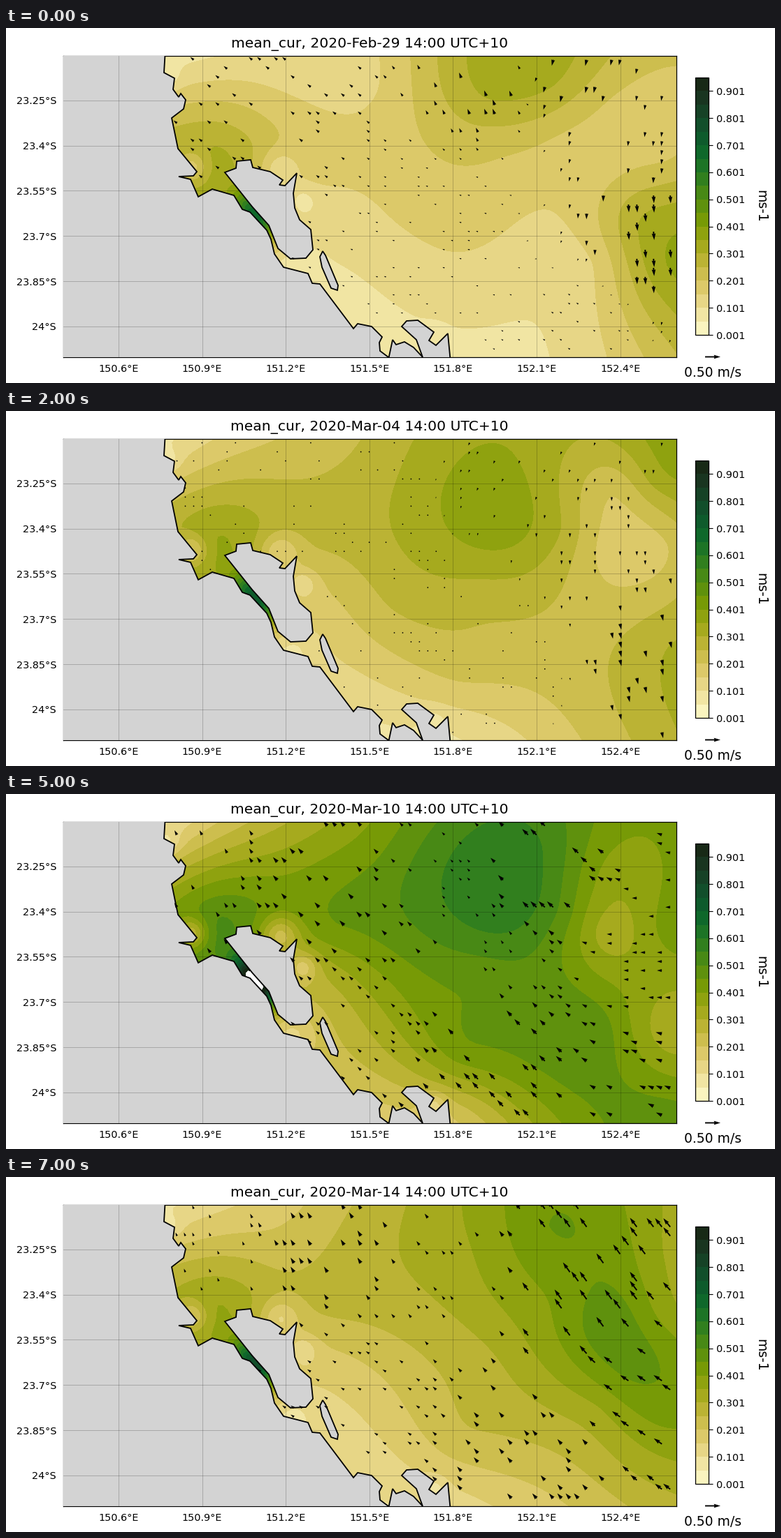
Recreate the animation shown at these times as a matplotlib script. Size 1100x509 px, loop 8000 ms.

```python
import matplotlib.pyplot as plt
import numpy as np
from matplotlib.animation import FuncAnimation
from matplotlib.cm import ScalarMappable
from matplotlib.colors import BoundaryNorm, LinearSegmentedColormap, ListedColormap
from matplotlib.path import Path
from matplotlib.patches import PathPatch

# All layout is in stage pixels, y pointing down.
W, H, DPI = 1100, 509, 128
L, R, T, B = 82, 958.5, 39.7, 471.5
PX = 72 / DPI
TICK, BIG, HEAD = 14.43, 18.76, 20.2

LEVELS = np.arange(0.001, 0.96, 0.05)
BANDS = len(LEVELS) - 1
SPEED = ["#fefccd", "#efe19c", "#ddc96a", "#c2b63b", "#9da715", "#749905",
         "#4b8a14", "#237924", "#0b642c", "#124e2b", "#193822", "#172312"]
ramp = LinearSegmentedColormap.from_list("speed", SPEED, 512)
CMAP = ListedColormap(ramp((np.arange(BANDS) + 0.5) / BANDS))
NORM = BoundaryNorm(LEVELS, BANDS)

MAINLAND = [
    (70, 30), (228, 30), (226, 64), (241, 72), (239, 88), (247, 99),
    (250, 94), (257, 103), (254, 116), (237, 129), (246, 173), (273, 206),
    (268, 212), (247, 213), (264, 217), (275, 242), (295, 231), (326, 240),
    (338, 260), (349, 264), (373, 290), (379, 303), (384, 324), (397, 343),
    (432, 352), (438, 366), (449, 367), (497, 431), (503, 424), (523, 428),
    (538, 443), (534, 451), (535, 463), (547, 472), (547, 480), (70, 480)]
HEADLAND = [
    (546, 480), (553, 447), (558, 454), (570, 450), (583, 458), (596, 472),
    (587, 447), (566, 428), (573, 420), (589, 419), (612, 436), (605, 448),
    (615, 455), (632, 438), (636, 480)]
ISLAND = [
    (313, 207), (329, 201), (330, 191), (350, 189), (353, 200), (378, 206),
    (396, 218), (391, 225), (399, 226), (416, 208), (411, 237), (413, 258),
    (420, 275), (436, 289), (439, 318), (429, 330), (407, 331), (389, 316),
    (376, 283), (352, 256)]
ISLET = [(453, 320), (449, 328), (452, 343), (465, 373), (474, 376), (475, 369),
         (457, 326)]
COAST = [Path(p + p[:1], closed=True) for p in (MAINLAND, HEADLAND, ISLAND, ISLET)]

# Places where the speed of each day is known
SITES = np.array([
    (235, 50), (390, 110), (520, 80), (690, 92), (775, 70), (870, 110), (930, 100),
    (302, 190), (470, 190), (705, 165), (800, 170), (860, 200), (945, 190),
    (430, 265), (540, 290), (680, 270), (900, 270), (945, 340),
    (480, 390), (650, 370), (845, 335), (650, 460), (945, 460)])
# Shallow water that slows the current: x, y, radius
SHOALS = [(424, 248, 15), (405, 345, 26), (392, 203, 20), (232, 70, 12),
          (612, 448, 13), (265, 200, 16)]

GX, GY = np.meshgrid(np.arange(L, R + 6, 6), np.arange(T, B + 6, 6))
MESH = np.c_[GX.ravel(), GY.ravel()]
ax_, ay_ = np.meshgrid(280.4 + 11.96 * np.arange(-6, 57), 45.6 + 12.97 * np.arange(33))
TAILS = np.c_[ax_.ravel(), ay_.ravel()]
TAILS = TAILS[~np.any([p.contains_points(TAILS) for p in COAST], axis=0)]


def dist2(a, b):
    return ((a[:, None] - b) ** 2).sum(2) / 1e4


def spline_basis(p):
    d = dist2(p, SITES)
    return np.c_[d * np.log(d + 1e-9), np.ones(len(p)), p / 100]


def spline(values):
    """Thin plate through the values at the sites."""
    a = spline_basis(SITES)
    n = len(SITES)
    full = np.vstack([a, np.c_[a[:, n:].T, np.zeros((3, 3))]])
    c = np.linalg.solve(full, np.r_[values, np.zeros(3)])
    return (spline_basis(MESH) @ c).reshape(GX.shape)


def sea(values, strait, flow):
    """Speed on the mesh, and arrow components, for one day."""
    s = spline(values)
    for x, y, r in SHOALS:
        s *= 1 - .45 * np.exp(-((GX - x) ** 2 + (GY - y) ** 2) / (2 * r * r))
    along = (GX - 357) * .62 + (GY - 270) * .785
    across = (GX - 357) * .785 - (GY - 270) * .62
    s += strait * np.exp(-(along / 27) ** 2 / 2 - (across / 14) ** 2 / 2)
    f = np.array(flow)
    w = (dist2(TAILS, f[:, :2]) + .03) ** -2
    return np.clip(s / 100, .002, None), w @ f[:, 2:] / w.sum(1, keepdims=True)


def mean(a, b):
    return (a[0] + b[0]) / 2, (a[1] + b[1]) / 2


feb29 = sea(
    [9, 17, 14, 31, 32, 19, 18, 32, 17, 22, 18, 18, 20, 13, 14, 17, 29, 35,
     9, 13, 16, 9, 24], 48,
    [(400, 90, -5, 4), (700, 85, -3, 8), (800, 75, -2, -9), (900, 150, -1, -7),
     (930, 300, 1, -12), (640, 270, -3, 1), (820, 430, -3, 2)])
mar04 = sea(
    [11, 26, 27, 37, 32, 21, 32, 36, 26, 38, 29, 18, 20, 19, 24, 27, 22, 30,
     13, 22, 24, 11, 29], 50,
    [(500, 150, -.4, -1), (750, 60, -2, -4), (840, 200, 0, -6), (930, 340, 2, -9),
     (700, 350, 0, 0)])
mar06 = sea(
    [11, 35, 37, 56, 42, 24, 32, 48, 37, 51, 34, 18, 22, 24, 32, 41, 20, 23,
     18, 32, 34, 15, 33], 64,
    [(340, 90, -4, 2), (550, 250, 0, 0), (850, 60, -4, -1), (920, 200, -4, -4),
     (900, 310, 0, -7), (780, 420, 0, 0)])
mar08 = sea(
    [12, 38, 42, 65, 52, 29, 41, 56, 44, 62, 41, 21, 43, 27, 36, 49, 30, 22,
     23, 42, 52, 21, 53], 80,
    [(430, 110, -4, 5), (540, 260, -6, 6), (700, 420, -8, 9), (690, 150, -1, 2),
     (900, 200, -1, -2), (890, 440, -7, 1)])
mar12 = sea(
    [13, 40, 44, 52, 56, 46, 38, 47, 45, 56, 54, 44, 41, 30, 38, 43, 46, 42,
     23, 44, 44, 23, 42], 66,
    [(270, 70, -3, 8), (450, 120, -9, 9), (620, 120, -6, 5), (780, 120, -17, 16),
     (920, 200, -13, 2), (690, 240, -5, 7), (720, 400, -9, 9), (500, 350, -4, 3)])
mar14 = sea(
    [11, 23, 28, 37, 45, 43, 36, 36, 26, 36, 42, 48, 37, 18, 20, 28, 47, 42,
     12, 24, 34, 14, 29], 54,
    [(280, 120, -2, 5), (460, 100, -5, 8), (640, 170, -4, 5), (830, 170, -10, 14),
     (920, 300, -12, 8), (770, 390, -6, 7), (500, 310, -5, 3)])

DAYS = [("Feb-29", feb29), ("Mar-02", mean(feb29, mar04)), ("Mar-04", mar04),
        ("Mar-06", mar06), ("Mar-08", mar08), ("Mar-10", mean(mar08, mar12)),
        ("Mar-12", mar12), ("Mar-14", mar14)]

plt.rcParams.update({"font.family": "DejaVu Sans", "font.size": TICK * PX})
fig = plt.figure(figsize=(W / DPI, H / DPI), dpi=DPI, facecolor="white")


def panel(x0, y0, x1, y1):
    a = fig.add_axes([x0 / W, 1 - y1 / H, (x1 - x0) / W, (y1 - y0) / H])
    for spine in a.spines.values():
        spine.set_linewidth(1.25 * PX)
    return a


def label(x, y, s, size=TICK, ha="center", **kw):
    return fig.text(x / W, 1 - y / H, s, fontsize=size * PX, ha=ha, **kw)


def arrows(xy, uv, **kw):
    return ax.quiver(*xy.T, *uv.T, units="dots", scale_units="dots", scale=1,
                     width=1.9, zorder=4, **kw)


ax = panel(L, T, R, B)
ax.set(xlim=(L, R), ylim=(B, T), xticks=[], yticks=[], autoscale_on=False)
for path in COAST:
    ax.add_patch(PathPatch(path, fc="#d3d3d3", ec="black", lw=1.8 * PX, zorder=3))

grid = dict(color="black", alpha=.25, lw=.8 * PX, zorder=5)
for i in range(7):
    x = 161 + 119.6 * i
    ax.axvline(x, **grid)
    label(x, 493.3, f"{150.6 + .3 * i:.1f}°E")
for i in range(6):
    y = 103.6 + 64.9 * i
    ax.axhline(y, **grid)
    label(72, y + 5.3, f"{23.25 + .15 * i:.4g}°S", ha="right")

bar = fig.colorbar(ScalarMappable(NORM, CMAP), cax=panel(986, 71, 1005, 440),
                   ticks=LEVELS[::2], format="%.3f")
bar.minorticks_off()
bar.outline.set_linewidth(1.25 * PX)
bar.ax.tick_params(length=5.5 * PX, width=1.15 * PX, pad=6 * PX)
label(1080, 255, "ms-1", BIG, rotation=270, va="center")

arrows(np.array([[1000, B]]), np.array([[22, 0]]), clip_on=False)
label(1011, 500, "0.50 m/s", BIG)
title = label(519.7, 28, "", HEAD)
layers = []


def draw(i):
    while layers:
        layers.pop().remove()
    day, (speed, uv) = DAYS[i]
    title.set_text(f"mean_cur, 2020-{day} 14:00 UTC+10")
    pick = np.random.default_rng(40 + i).random(len(TAILS)) < .135
    layers.append(ax.contourf(GX, GY, speed, LEVELS, cmap=CMAP, norm=NORM, zorder=1))
    layers.append(arrows(TAILS[pick], uv[pick]))
    ax.set(xlim=(L, R), ylim=(B, T))
    return layers


anim = FuncAnimation(fig, draw, frames=len(DAYS), interval=1000, repeat=True,
                     repeat_delay=0, blit=False)
plt.show()
```
